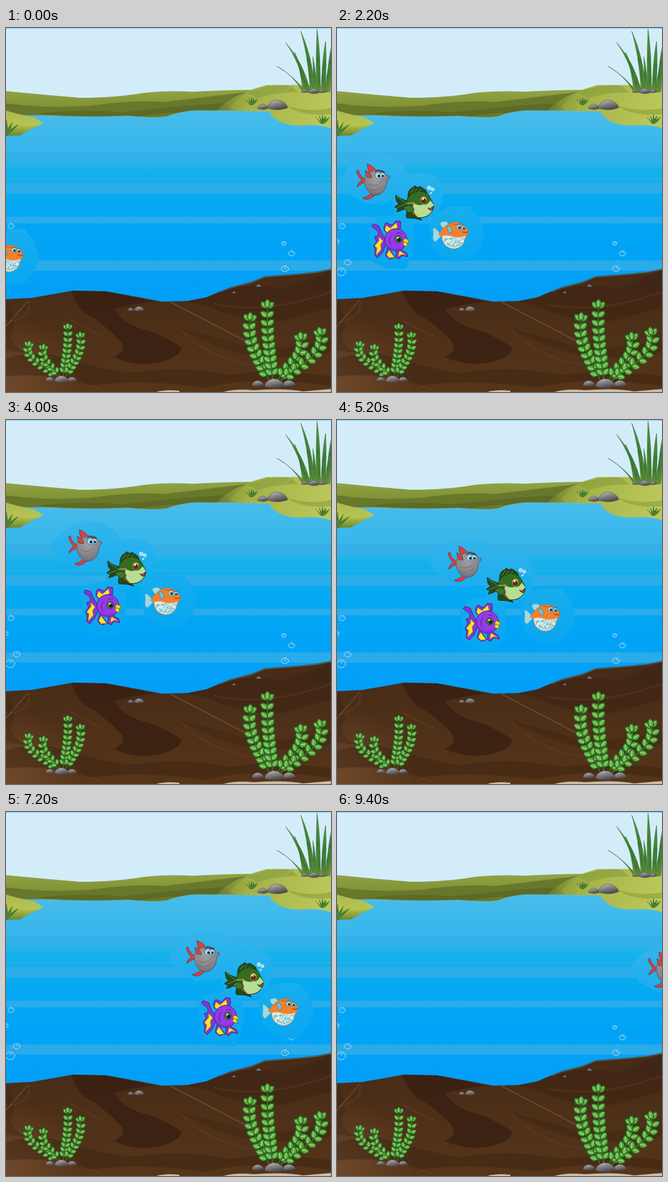
An HTML page for the animation above (9.6 s loop, 536 by 600 pixels).

```html
<!DOCTYPE html>
<html lang="en">
<head>
<meta charset="utf-8">
<title>Pond with four fish</title>
<style>
html, body { margin: 0; width: 100%; height: 100%; overflow: hidden; background: #d2edf9; }
svg { display: block; width: 536px; height: 600px; }
</style>
</head>
<body>
<svg viewBox="0 0 536 600" stroke-linecap="round" stroke-linejoin="round">
  <defs>
    <linearGradient id="water" gradientUnits="userSpaceOnUse" x1="0" y1="130" x2="0" y2="450">
      <stop offset="0" stop-color="#4bbdeb"/><stop offset=".28" stop-color="#30b5eb"/><stop offset=".32" stop-color="#18b1ea"/>
      <stop offset=".45" stop-color="#07acf0"/><stop offset=".6" stop-color="#02a6f5"/><stop offset="1" stop-color="#029ef8"/>
    </linearGradient>
    <linearGradient id="glow" gradientUnits="userSpaceOnUse" x1="0" y1="207" x2="0" y2="395">
      <stop offset="0" stop-color="#35b5eb"/><stop offset=".5" stop-color="#17adee"/><stop offset="1" stop-color="#07a6f2"/>
    </linearGradient>
    <linearGradient id="hill" x1="0" y1="0" x2="0" y2="1">
      <stop offset="0" stop-color="#97a94b"/><stop offset=".35" stop-color="#86973a"/><stop offset="1" stop-color="#74832c"/>
    </linearGradient>
    <linearGradient id="bank" x1="0" y1="0" x2="1" y2=".15">
      <stop offset="0" stop-color="#8a9a39" stop-opacity="0"/><stop offset=".35" stop-color="#a3b246"/><stop offset="1" stop-color="#bac65a"/>
    </linearGradient>
    <linearGradient id="left" x1="0" y1="0" x2="0" y2="1">
      <stop offset="0" stop-color="#a9b950"/><stop offset=".55" stop-color="#b7c452"/><stop offset="1" stop-color="#6e8429"/>
    </linearGradient>
    <linearGradient id="soil" x1="0" y1="0" x2="0" y2="1">
      <stop offset="0" stop-color="#452a17"/><stop offset="1" stop-color="#563519"/>
    </linearGradient>
    <radialGradient id="warm"><stop offset="0" stop-color="#7a5133"/><stop offset="1" stop-color="#7a5133" stop-opacity="0"/></radialGradient>
    <linearGradient id="rock" x1="0" y1="0" x2=".4" y2="1">
      <stop offset="0" stop-color="#c4c2c2"/><stop offset=".45" stop-color="#8b888a"/><stop offset="1" stop-color="#4c4a4d"/>
    </linearGradient>
    <linearGradient id="blade" x1="0" y1="0" x2="0" y2="1">
      <stop offset="0" stop-color="#5a9c40"/><stop offset=".5" stop-color="#3a7c30"/><stop offset="1" stop-color="#6c963c"/>
    </linearGradient>
    <radialGradient id="gray" cx=".45" cy=".35" r=".75">
      <stop offset="0" stop-color="#a09fa4"/><stop offset=".6" stop-color="#858489"/><stop offset="1" stop-color="#606066"/>
    </radialGradient>
    <path id="shore" d="M0 143Q30 145 62 144Q130 148 200 145Q245 149 265 146Q285 138 312 136Q370 136 435 138Q438 148 455 156Q475 163 500 160Q520 160 536 165"/>
    <clipPath id="lake"><path d="M0 143Q30 145 62 144Q130 148 200 145Q245 149 265 146Q285 138 312 136Q370 136 435 138Q438 148 455 156Q475 163 500 160Q520 160 536 165V460H0Z"/></clipPath>
    <clipPath id="ground"><path d="M0 447L42 445 110 433 165 434 215 443 258 451 300 450 330 444 370 427 405 418 427 409 480 405 510 402 536 397V600H0Z"/></clipPath>
  </defs>

  <rect width="536" height="600" fill="#d2edf9"/>
  <rect width="536" height="1.2" fill="#83d3ee"/>
  <path fill="url(#hill)" d="M0 104Q60 110 122 115Q180 115 226 107Q260 103 310 105Q365 102 404 102L430 94 536 95V170H0Z"/>
  <path fill="#64742a" opacity=".85" d="M0 124Q65 133 140 128Q215 118 260 122Q330 114 402 105Q375 118 366 138L300 150H0Z"/>
  <path fill="#515f22" opacity=".5" d="M50 142Q110 133 190 139Q285 128 360 124L385 140H260L200 148Z"/>
  <path fill="url(#bank)" d="M345 139Q365 115 404 103Q424 92 462 94L536 95V170H455Z"/>
  <path fill="#819739" opacity=".5" d="M398 107Q430 92 470 95L482 106Q440 106 414 116ZM462 128Q500 140 536 132V142Q490 147 462 128Z"/>

  <g clip-path="url(#lake)">
    <rect y="130" width="536" height="330" fill="url(#water)"/>
    <g id="bands" fill="#35aee8" opacity=".8"></g>
  </g>
  <use href="#shore" fill="none" stroke="#7fbfae" opacity=".6"/>
  <path fill="url(#left)" d="M0 136Q22 143 46 147L62 157 46 164Q30 173 24 177L0 178Z"/>

  <g clip-path="url(#ground)">
    <rect y="390" width="536" height="210" fill="url(#soil)"/>
    <ellipse cx="0" cy="585" rx="130" ry="110" fill="url(#warm)" opacity=".7"/>
    <g fill="#361e10">
      <path opacity=".75" d="M108 432L165 434 245 451Q205 455 178 464Q195 490 238 500Q270 512 290 528Q285 545 248 552Q210 558 178 542Q205 530 184 511Q165 492 143 477Q117 466 108 432Z"/>
      <path opacity=".4" d="M235 450Q292 444 340 462Q400 488 460 482L536 460V400L460 430Q390 415 335 444ZM0 545Q45 530 82 540Q140 558 200 569Q290 555 370 572Q440 560 536 574V590Q410 572 330 593Q220 577 132 590Q70 568 0 574Z"/>
      <path opacity=".3" d="M0 455Q20 480 11 500Q2 520 32 535L0 532ZM285 495Q350 510 395 525Q465 533 536 512V535Q450 552 380 535Q326 518 285 495Z"/>
    </g>
    <path fill="none" stroke="#694426" stroke-width="3" opacity=".35" d="M0 485Q43 480 38 448M105 480Q130 495 160 508M290 500Q340 550 425 558M345 455Q430 473 536 435M0 576Q75 565 155 596"/>
    <path fill="none" stroke="#9a8167" opacity=".7" d="M272 452L395 516M0 492L36 450"/>
    <path fill="none" stroke="#4d8290" stroke-width="4" opacity=".6" d="M355 433L370 427 405 418 427 409 480 405 510 402 536 397"/>
    <path fill="#cabda9" d="M248 600Q264 595 286 598V600ZM358 600Q380 594 408 597Q460 593 490 599L536 595V600Z"/>
  </g>
  <g id="scenery"></g>
  <path fill="none" stroke="#b0bd83" opacity=".7" d="M475 91L438 127"/>
  <g id="bubbles" fill="none" stroke="#b9e3fa"></g>

  <g id="school">
    <g fill="url(#glow)">
      <path d="M2 252L20 228 42 215 63 208 88 213 108 224 118 240 113 262 84 288 50 291 18 273Z"/>
      <path d="M88 268L105 247 130 239 157 240 172 254 176 272 168 300 148 318 118 322 96 312Z"/>
      <path d="M52 330L68 312 100 308 124 320 128 345 124 374 114 397 82 397 57 384Z"/>
      <path d="M150 322L165 302 190 294 219 294 233 312 243 336 237 360 218 384 188 385 158 366Z"/>
    </g>
    <g stroke="#5b3433" stroke-width=".8">
      <path fill="#e23c3e" d="M48 250Q38 246 35 234L32 236Q35 246 41 251Q34 255 33 262Q40 256 48 253ZM50 224Q50 234 55 240L65 236Q60 227 50 224ZM58 271Q50 279 42 280Q47 284 55 281L65 274Z"/>
      <path fill="url(#gray)" stroke="#55545a" d="M45 250Q47 240 58 236Q68 231 77 236Q79 243 87 244L87 247Q82 249 82 257Q80 270 69 275Q58 278 52 270Q46 263 45 250Z"/>
      <path fill="#d34544" d="M47 235Q46 241 50 246L57 247Q57 239 47 235Z"/>
      <path fill="none" stroke="#686870" d="M52 257Q65 265 76 251M51 265Q61 272 74 261"/>
      <g fill="#a4dff4" stroke="#3d7189"><circle cx="68" cy="243" r="5"/><circle cx="75" cy="243" r="4.4"/></g>
      <g fill="#172c3c" stroke="none"><circle cx="69" cy="244" r="2.3"/><circle cx="75.5" cy="244" r="2"/></g>
      <path fill="none" stroke="#303039" stroke-width="1.6" d="M63 237Q69 233 72 237M73 236L78 238"/>
    </g>

    <g stroke="#16331a">
      <path fill="#25491a" d="M118 286Q102 281 97 275Q96 286 102 290L95 295 101 298 98 303Q111 301 118 292ZM117 281Q116 266 125 263L128 260 133 263 137 261 146 267 149 273ZM118 299Q112 306 115 313L130 314 140 317 128 301Z"/>
      <path fill="#336d20" d="M114 288Q117 273 132 269Q149 267 155 283L160 292 158 300Q150 315 134 312Q117 308 114 288Z"/>
      <path fill="#b9dd92" stroke="none" d="M125 288Q136 294 141 291Q149 293 154 284L160 292 158 299Q151 313 134 312Q124 305 125 288Z"/>
      <path fill="none" stroke="#c94c3a" stroke-width="1.4" d="M127 287Q121 301 132 311"/>
      <path fill="none" stroke="#c8ce7b" d="M115 289L127 288"/>
      <path fill="#41752a" d="M123 293Q112 291 109 297L120 305 127 300Z"/>
      <path fill="none" stroke="#6c9a3c" d="M99 278L114 289M99 296L114 290M121 272L127 264M128 270L132 265M135 270L139 266"/>
      <ellipse cx="143" cy="284" rx="5.4" ry="6.4" fill="#e5cf85" stroke="#665522"/>
      <circle cx="143" cy="285" r="4.4" fill="#582f18" stroke="none"/><circle cx="142" cy="282" r="1.4" fill="#fff" stroke="none"/>
      <path fill="#b73d37" d="M150 297Q155 299 159 293L158 299Q155 303 150 297Z"/>
      <g fill="#9bd5f2" stroke="#d8f2fb"><circle cx="152" cy="263.5" r="3"/><circle cx="158" cy="266" r="2.5"/><circle cx="155" cy="272" r="1.2"/></g>
    </g>

    <g stroke="#40227a">
      <path fill="#8535d7" d="M78 345Q72 336 69 326L60 323 57 327 65 333Q70 337 67 343L62 344 65 352 60 359 63 365 62 375 67 379 75 370 81 357ZM78 334Q76 325 81 321L91 325 97 318 105 319 105 330Q98 337 85 339ZM83 362L80 375 87 381 96 378 89 368ZM98 366L97 378 102 381 108 375 117 377 115 371 107 366Z"/>
      <path fill="#f6e527" stroke="#8c7127" stroke-width=".8" d="M69 344L76 351 72 357 73 365 64 375 66 363 62 359 69 351ZM79 333L81 325 88 330 98 321 100 329Q93 335 83 337ZM86 366L95 378 86 379 82 374ZM103 367L115 375 107 373 101 377Z"/>
      <circle cx="97" cy="349" r="18.3" fill="#943be9"/>
      <path fill="#7827c4" stroke="none" opacity=".45" d="M80 354Q91 370 112 358Q106 371 95 368Q83 366 80 354Z"/>
      <path fill="none" d="M90 342Q83 350 89 358M98 339Q103 335 107 340"/>
      <circle cx="101" cy="348" r="5.7" fill="#528346" stroke="#253326"/>
      <circle cx="102" cy="349" r="3.2" fill="#13251c" stroke="none"/><circle cx="100" cy="346" r="1.4" fill="#fff" stroke="none"/>
      <path fill="#f5dc26" stroke="#7c5b1d" d="M110 349Q112 345 116 349L119 352 115 355 117 359Q112 361 109 357ZM110 353H115"/>
    </g>

    <g stroke="#ba6c36" stroke-width=".8">
      <path fill="#9cd9e6" stroke="#4c9dab" d="M171 340Q162 327 158 330Q159 337 158 347Q161 356 165 350L172 343ZM180 333Q170 328 170 321Q174 318 181 319L187 328Z"/>
      <path fill="#f3802c" d="M168 340Q177 324 192 320Q206 320 211 328L216 332 215 342 211 345Q210 362 193 364Q174 362 173 344Z"/>
      <path fill="#dcebe5" stroke="#d49863" d="M173 343Q182 340 192 344Q204 346 213 342L211 346Q209 362 193 364Q174 362 173 343Z"/>
      <g id="spots" fill="#68b6cc" stroke="none"></g>
      <path fill="#73c1d1" stroke="#447f8b" d="M185 338Q180 329 182 326Q189 326 190 336Z"/>
      <path fill="none" stroke="#d35c1e" stroke-width="1.6" d="M190 323L197 324M206 336L215 337"/>
      <g fill="#93d7e8" stroke="#3a7f93"><circle cx="201" cy="328" r="4.2"/><circle cx="209" cy="329" r="3.6"/></g>
      <g fill="#173647" stroke="none"><circle cx="202" cy="329" r="2.1"/><circle cx="209.5" cy="330" r="1.8"/></g>
      <path fill="none" stroke="#91351d" d="M208 337Q212 339 216 336M198 324L204 323M207 325L212 326"/>
    </g>
  </g>
</svg>
<script>
const LOOP = 9600, STEP = 200;
const $ = id => document.getElementById(id);
const repeat = (n, make) => Array.from({ length: n }, (_, i) => make(i)).join("");

let seed = 7;
const rand = () => (seed = seed * 16807 % 2147483647) / 2147483647;

// Cubic from a to b with end slopes m and n over the span h
function hermite(a, b, m, n, h, t) {
  const u = 1 - t;
  return u * u * (1 + 2 * t) * a + t * t * (3 - 2 * t) * b + h * t * u * (u * m - t * n);
}

function rock(x, y, rx) {
  const ry = rx * .5;
  return `<path d="M${x - rx} ${y + ry * .6}Q${x - rx} ${y - ry * .5} ${x - rx * .2} ${y - ry}` +
    `Q${x + rx * .7} ${y - ry} ${x + rx} ${y + ry * .5}Q${x} ${y + ry * 1.3} ${x - rx} ${y + ry * .6}Z" ` +
    `fill="url(#rock)" stroke="#4d4a4b" stroke-width=".6"/>`;
}

// Two small stones beside a larger one
const pile = (x, y, r) => rock(x - r * 1.7, y, r * .6) + rock(x + r * 1.5, y, r * .65) + rock(x, y, r);

function leaf(x, y, angle, size) {
  return `<g transform="translate(${x} ${y}) rotate(${angle}) scale(${size})">` +
    `<path d="M0 0C.2 -.5 .75 -.4 1 0C.75 .4 .2 .5 0 0Z" fill="#5cad40" stroke="#265c24" stroke-width=".1"/>` +
    `<path d="M.2 -.04H.75" stroke="#9bd673" stroke-width=".12"/></g>`;
}

// A stem leaves the base sideways, then rises to the tip with leaf pairs
function stem(bx, by, tx, ty, size) {
  const dx = tx - bx, dy = ty - by;
  const pairs = Math.round(Math.hypot(dx, dy) / size * 1.15);
  const point = t => [hermite(bx, tx, dx * 1.1, -dx * .4, 1, t), hermite(by, ty, dy * .9, dy * 1.3, 1, t)];
  return repeat(pairs, i => {
    const t = (i + 1) / pairs, [x, y] = point(t), [px, py] = point(t - .02);
    const a = Math.atan2(y - py, x - px) * 180 / Math.PI;
    return `<path d="M${point(t - 1 / pairs)}L${x} ${y}" stroke="#39782b" stroke-width="${size / 8}"/>` +
      leaf(x, y, a - 50, size) + leaf(x, y, a + 50, size) + (i === pairs - 1 ? leaf(x, y, a, size) : "");
  });
}

const plant = (x, y, size, tips) =>
  tips.map(([tx, ty], i) => stem(x + (i - 1.5) * size * .4, y, tx, ty, size)).join("") + pile(x, y + 4, size * 1.15);

function blade(x, y, tx, ty, w) {
  const mx = x + (tx - x) * .35, my = y + (ty - y) * .65;
  return `<path d="M${x - w} ${y}Q${mx - w} ${my} ${tx} ${ty}Q${mx + w * 1.5} ${my + 4} ${x + w} ${y}Z" ` +
    `fill="url(#blade)" stroke="#2b5f2b" stroke-width=".5"/>`;
}

const tuft = (x, y, h) => repeat(5, i =>
  blade(x + i - 2, y, x + (i - 2) * h * .4, y - h * (1 - Math.abs(i - 2) * .15), 1.2));

const tips = [[447, 63], [461, 24], [486, 5], [513, 2], [527, 22], [542, 8]];
const grass = tips.map(([x, y], i) => blade(491 + i * 8, 105, x, y, i ? 3.2 : 1.8)).join("") +
  repeat(7, i => blade(492 + i * 6, 105, 476 + i * 10, 40 + rand() * 35, 2));

$("scenery").innerHTML = grass + pile(508, 104, 9) + rock(424, 130, 9) + rock(448, 127, 17) +
  tuft(405, 126, 12) + tuft(522, 157, 14) + tuft(1, 176, 24) +
  rock(206, 464, 5) + rock(220, 463, 8) + rock(417, 425, 4) + rock(376, 436, 3) +
  plant(92, 575, 10, [[37, 525], [61, 530], [102, 496], [123, 510]]) +
  plant(443, 582, 14, [[402, 482], [431, 461], [487, 514], [519, 506]]);

$("bands").innerHTML = [[205, 15], [247, 3], [256, 17], [311, 11], [383, 17]]
  .map(([y, h]) => `<rect y="${y}" width="536" height="${h}"/>`).join("");

$("bubbles").innerHTML = [[8.5, 326.5, 5], [-.5, 352, 4], [17.5, 386, 5.5], [7, 402, 7.5],
  [458, 355, 3.5], [471, 371.5, 5], [460, 397, 5.8]].map(([x, y, r]) =>
  `<ellipse cx="${x}" cy="${y}" rx="${r}" ry="${r * .82}"/><path d="M${x} ${y - r * .2}l${r * .3} ${-r * .25}" stroke="#e1f5ff"/>`).join("");

$("spots").innerHTML = repeat(80, () => {
  const a = rand() * Math.PI, r = Math.sqrt(rand());
  return `<circle cx="${193 + Math.cos(a) * r * 17}" cy="${345.5 + Math.sin(a) * r * 16}" r=".9"/>`;
});

// Key points of the swim: time, x, y
const path = [[0, -188, 38], [1200, -35, 14], [2200, 0, 0], [4000, 71, -43], [5200, 151, -16],
  [6200, 217, 27], [7200, 265, -12], [8600, 360, 6], [9400, 481, 7], [9600, 511, 7]];
const slope = (i, c) => (path[i + 1][c] - path[i][c]) / (path[i + 1][0] - path[i][0]);

// Harmonic mean of neighbouring slopes, flat at a turning point
function tangent(i, c) {
  const before = slope(Math.max(i - 1, 0), c), after = slope(Math.min(i, path.length - 2), c);
  return before * after > 0 ? 2 * before * after / (before + after) : 0;
}

function draw(ms) {
  const t = Math.floor(ms % LOOP / STEP) * STEP;
  const i = path.findIndex(k => k[0] > t) - 1, h = path[i + 1][0] - path[i][0];
  const [x, y] = [1, 2].map(c =>
    hermite(path[i][c], path[i + 1][c], tangent(i, c), tangent(i + 1, c), h, (t - path[i][0]) / h));
  $("school").setAttribute("transform", `translate(${x.toFixed(1)} ${y.toFixed(1)})`);
}

let start;
function tick(now) {
  start ??= now;
  draw(now - start);
  requestAnimationFrame(tick);
}
draw(0);
requestAnimationFrame(tick);
</script>
</body>
</html>
```
